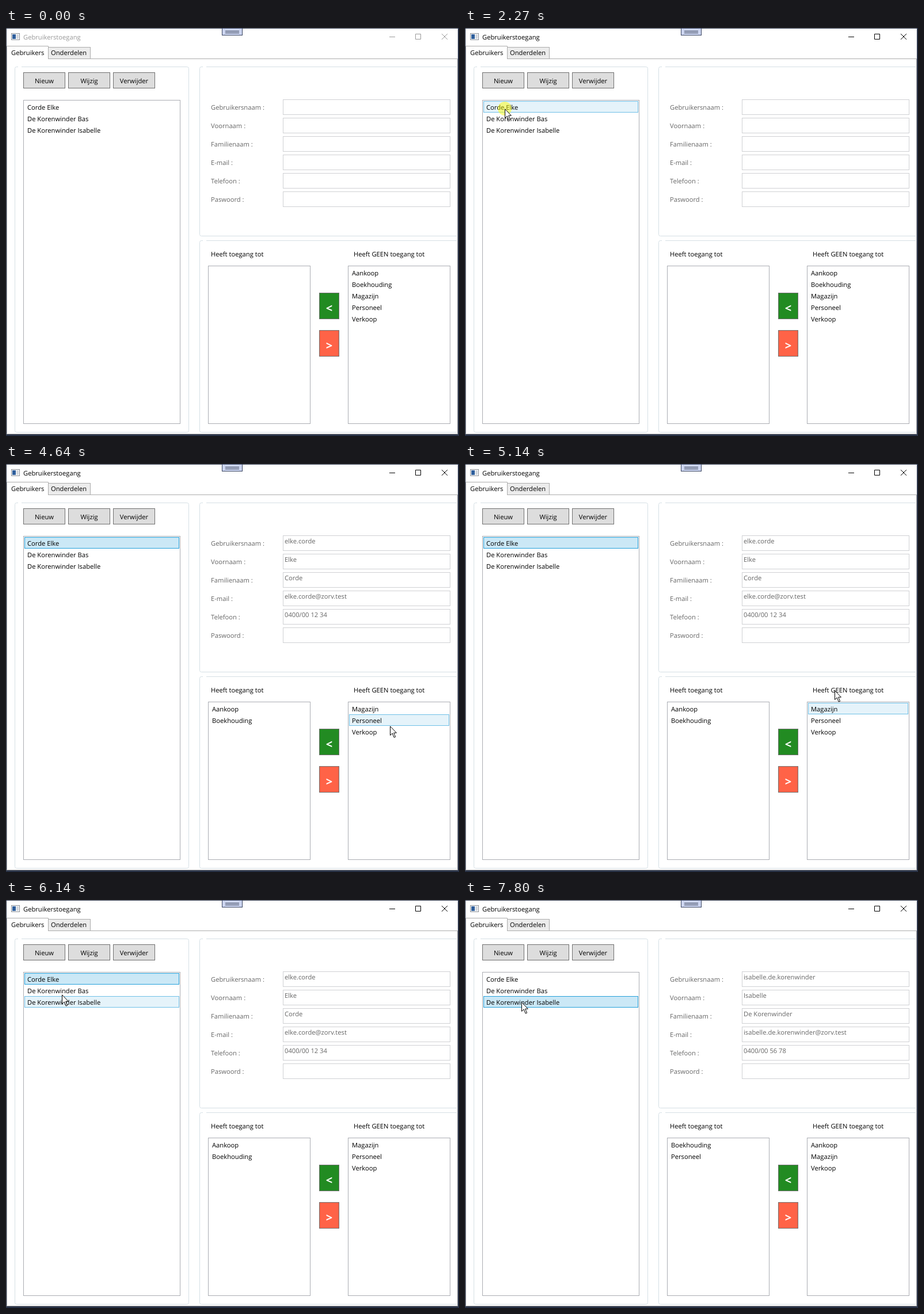
Write an HTML page that moves like this. It is 787 by 709 pixels and loops after 8000 ms.

```html
<!DOCTYPE html>
<html lang="nl">
<head>
<meta charset="utf-8">
<title>Gebruikerstoegang</title>
<style>
  html, body { margin: 0; width: 100%; height: 100%; overflow: hidden; background: #fff; }
  #stage { display: block; width: 100%; height: 100%; }
  text { font: 11.2px "Open Sans", "Noto Sans", sans-serif; text-rendering: geometricPrecision; white-space: pre; }
  .center { text-anchor: middle; }
  .sign { font-size: 20px; font-weight: 700; text-anchor: middle; }
</style>
</head>
<body>
<svg id="stage" viewBox="0 0 787 709"></svg>
<script>
const LOOP = 8000, HOVER_LAG = 70, ROW = 20;
const GREY = '#666', LINE = '#acacac', DARK = '#2b3448';
const stage = document.getElementById('stage');

function add(tag, attrs, parent = stage) {
  const node = document.createElementNS('http://www.w3.org/2000/svg', tag);
  for (const key in attrs) node.setAttribute(key, attrs[key]);
  parent.appendChild(node);
  return node;
}
const block = (x, y, width, height, fill, parent) => add('rect', { x, y, width, height, fill }, parent);
// Box with a crisp 1px border inside its outer bounds
const frame = (x, y, w, h, fill, stroke, rx = 0, parent = stage) =>
  add('rect', { x: x + .5, y: y + .5, width: w - 1, height: h - 1, fill, stroke, rx }, parent);
const path = (d, stroke) => add('path', { d, stroke, fill: 'none' });
function label(x, y, value, fill = '#000', style = '') {
  const node = add('text', { x, y, fill, class: style });
  node.textContent = value;
  return node;
}
const show = (node, on) => node.setAttribute('visibility', on ? 'visible' : 'hidden');
const moveTo = (node, [x, y]) => node.setAttribute('transform', `translate(${x} ${y})`);

// Window edges and title bar
block(0, 0, 787, 709, DARK);
block(1, 1, 784, 705, '#fff');
frame(9, 9, 15, 12, '#fff', '#8a8f96');
block(11, 11, 6, 8, '#2f5f9c');
block(18, 11, 4, 8, '#d3d8de');
const title = label(30, 20, 'Gebruikerstoegang');
const controls = path('M666 15.5h10M711.5 10.5h9v9h-9zM757 10l10 10m0-10l-10 10');
frame(375, 0, 36, 13, '#ccd5f0', '#3a4560');
path('M381 5.5h24m-24 3h24', DARK);

// Tabs
path('M1.5 54V705.5H784.5V53.5H73', LINE);
frame(73, 33, 74, 21, '#ececec', LINE);
path('M1.5 54V31.5H73.5V53.5', LINE);
label(9, 47, 'Gebruikers');
label(78, 47, 'Onderdelen');

// Group boxes, cut off at the right, with a gap in the top line
const groups = add('svg', { width: 783, height: 709 });
function group(x, y, w, h) {
  frame(x, y, w, h, 'none', '#d5dfe5', 3, groups);
  block(x + 6, y, 6, 1, '#fff', groups);
}
group(15, 67, 303, 636);
group(336, 67, 460, 295);
group(336, 369, 460, 334);

// Buttons
['Nieuw', 'Wijzig', 'Verwijder'].forEach((name, i) => {
  const x = 30 + 78 * i;
  frame(x, 77, 73, 28, '#ddd', '#707070');
  label(x + 36.5, 96, name, '#000', 'center');
});
['#228b22', '#ff6347'].forEach((color, i) => {
  const y = 460 + 65 * i;
  frame(544, y, 35, 46, color, '#707070');
  label(561.5, y + 34, '<>'[i], '#fff', 'sign');
});

// Form
const fields = ['Gebruikersnaam', 'Voornaam', 'Familienaam', 'E-mail', 'Telefoon', 'Paswoord'].map((name, i) => {
  const y = 124 + 32 * i;
  label(356, y + 18, name + ' :', GREY);
  frame(481, y, 291, 27, '#fff', '#d0d1d4');
  return label(484, y + 14, '', GREY);
});
label(356, 397, 'Heeft toegang tot');
label(604, 397, 'Heeft GEEN toegang tot');

// Lists
function makeList(x, y, w, h, count) {
  frame(x, y, w, h, '#fff', '#abadb3');
  const rows = Array.from({ length: count }, (_, i) => ({
    back: frame(x + 2, y + 2 + ROW * i, w - 4, ROW, 'none', 'none'),
    text: label(x + 7, y + 17 + ROW * i, '')
  }));
  return { x: x + 2, y: y + 2, w: w - 4, rows };
}
const userList = makeList(30, 125, 273, 563, 3);
const yesList = makeList(351, 413, 178, 275, 5);
const noList = makeList(594, 413, 178, 275, 5);

function drawList(list, items, [px, py], selected = -1) {
  const inside = px >= list.x && px < list.x + list.w;
  const hover = inside ? Math.ceil((py - list.y) / ROW) - 1 : -1;
  list.rows.forEach(({ back, text }, i) => {
    const [fill, stroke] = i >= items.length ? ['none', 'none']
      : i === selected ? ['#cbe8f6', '#26a0da']
      : i === hover ? ['#e5f3fa', '#70c0e7'] : ['none', 'none'];
    back.setAttribute('fill', fill);
    back.setAttribute('stroke', stroke);
    text.textContent = items[i] || '';
  });
}

// Data
const parts = ['Aankoop', 'Boekhouding', 'Magazijn', 'Personeel', 'Verkoop'];
const users = [
  { first: 'Elke', last: 'Corde', phone: '0400/00 12 34', access: ['Aankoop', 'Boekhouding'] },
  { first: 'Bas', last: 'De Korenwinder', phone: '0400/00 34 56', access: parts },
  { first: 'Isabelle', last: 'De Korenwinder', phone: '0400/00 56 78', access: ['Boekhouding', 'Personeel'] }
];
const names = users.map(u => `${u.last} ${u.first}`);
function details(user) {
  if (!user) return [];
  const login = `${user.first} ${user.last}`.toLowerCase().replaceAll(' ', '.');
  return [login, user.first, user.last, login + '@zorv.test', user.phone];
}

// Each click shows a spot; the choice takes effect as it ends
const CLICK = 150;
const clicks = [2210, 6390, 7660];
const spot = add('circle', { r: 12, fill: '#ff0', 'fill-opacity': .47 });
const arrow = add('path', {
  d: 'M.5 .8V16.5L4.2 13L7.2 20.2L9.6 19.2L6.7 12.2H11.4Z', fill: '#fff', stroke: '#000'
});

// Pointer strokes: each runs on from the last through its own points, then rests
const entry = [775, 674];
const strokes = [
  { from: 730, to: 1260, via: [[480, 280], [250, 126], [84, 127]] },
  { from: 1360, to: 1620, via: [[69, 140]] },
  { from: 2660, to: 3380, via: [[380, 91], [605, 240], [571, 299]] },
  { from: 3430, to: 4290, via: [[490, 195], [420, 380], [408, 450]] },
  { from: 4380, to: 4640, via: [[540, 442], [667, 455]] },
  { from: 4700, to: 5140, via: [[664, 478], [642, 393]] },
  { from: 5240, to: 5980, via: [[470, 449], [140, 220], [98, 170]] },
  { from: 6050, to: 6140, via: [[97, 164]] },
  { from: 6730, to: 7000, via: [[97, 160], [98, 175]] },
  { from: 7210, to: 7470, via: [[98, 177]] }
];

// Catmull-Rom curve through evenly timed points, u from 0 to 1
function curve(points, u) {
  const last = points.length - 1;
  const i = Math.min(Math.floor(u * last), last - 1), k = u * last - i;
  const [a, b, c, d] = [-1, 0, 1, 2].map(n => points[Math.max(0, Math.min(last, i + n))]);
  return b.map((_, j) => Math.round(.5 * (2 * b[j] + (c[j] - a[j]) * k
    + (2 * a[j] - 5 * b[j] + 4 * c[j] - d[j]) * k * k
    + (3 * b[j] - a[j] - 3 * c[j] + d[j]) * k ** 3)));
}

function pointerAt(t) {
  const n = strokes.findLastIndex(s => t >= s.from);
  if (n < 0) return [-50, -50];
  const { from, to, via } = strokes[n];
  const begin = n ? strokes[n - 1].via.at(-1) : entry;
  return curve([begin, ...via], Math.min(1, (t - from) / (to - from)));
}

function draw(t) {
  const selected = clicks.filter(c => t >= c + CLICK - 10).length - 1;
  const user = users[selected === 0 ? 0 : selected];
  const tone = t < clicks[0] ? '#999' : '#000';
  title.setAttribute('fill', tone);
  controls.setAttribute('stroke', tone);

  const values = details(user);
  fields.forEach((field, i) => { field.textContent = values[i] || ''; });

  const access = user ? user.access : [];
  const over = pointerAt(t - HOVER_LAG);
  drawList(userList, names, over, selected);
  drawList(yesList, access, over);
  drawList(noList, parts.filter(p => !access.includes(p)), over);

  const tip = pointerAt(t);
  moveTo(arrow, tip);
  moveTo(spot, tip);
  show(arrow, t >= strokes[0].from);
  show(spot, clicks.some(c => t >= c && t < c + CLICK - 10));
}

const start = performance.now();
function tick() {
  draw((performance.now() - start) % LOOP);
  requestAnimationFrame(tick);
}
draw(0);
requestAnimationFrame(tick);
</script>
</body>
</html>
```
